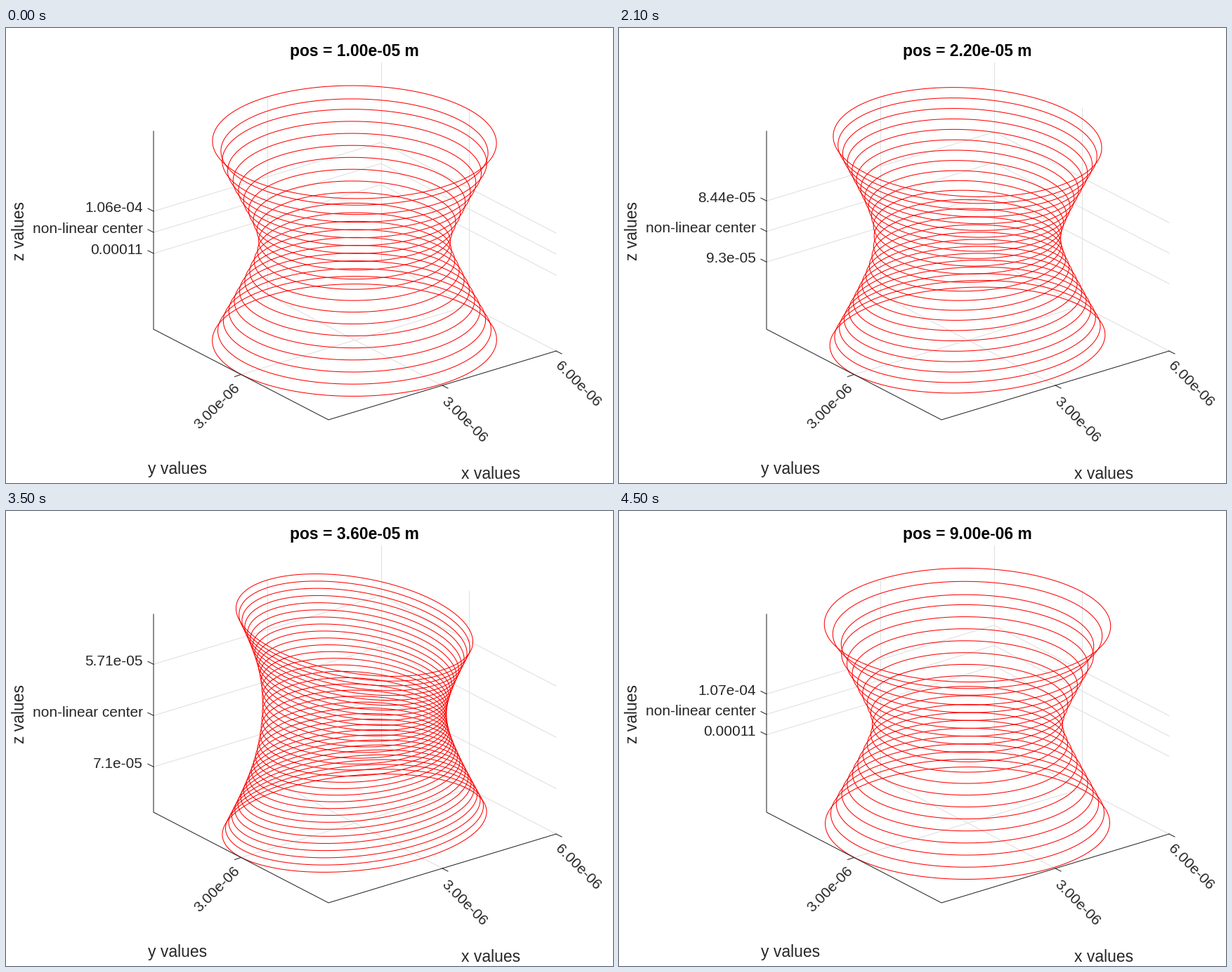
Recreate the animation shown at these times as a matplotlib script. Size 864 px wide and 648 px high, loop 4600 ms.

```python
import numpy as np
import matplotlib.pyplot as plt
from matplotlib.animation import FuncAnimation
from matplotlib.collections import LineCollection

W, H, DPI = 864, 648, 150
plt.rcParams["font.family"] = "Liberation Sans"
INK, GRID = "#262626", "#dfdfdf"

# Oblique box: floor corner nearest the viewer and its edge vectors, in pixels
FRONT = np.array([459, 558])
EX, EY, HEIGHT = np.array([324, -98]), np.array([-249, -129]), 282
LEFT, RIGHT, BACK = FRONT + EY, FRONT + EX, FRONT + EX + EY
CENTER = FRONT + (EX + EY) / 2
MID = CENTER[1] - HEIGHT / 2
UP = np.array([0, -HEIGHT])

# Beam parameters sampled over the position in micrometres
POS = [4, 9, 10, 16, 22, 28, 36, 40]
RINGS = [18, 19.8, 20, 21, 23, 26, 33, 40]
FOCUS_A = [-10, -1.5, -0.5, -8, -18, -34, -56, -68]
FOCUS_B = [-8, 3.5, 5, 12, 19, 27, 42, 48]
TICK_MID = [279, 289.6, 291, 290.7, 289.7, 288.7, 291.3, 288.7]
TICK_GAP = [26, 29, 30, 36, 43.5, 55, 73, 81.5]

RIM = 0.498        # largest radius, in box widths
AIR_STEP = 0.0294  # radius change per ring outside the medium

sequence = [10] * 10 + list(range(11, 41)) + list(range(4, 10))
theta = np.linspace(0, 2 * np.pi, 181)

fig = plt.figure(figsize=(W / DPI, H / DPI), dpi=DPI, facecolor="white")
ax = fig.add_axes([0, 0, 1, 1])
ax.set(xlim=(0, W), ylim=(H, 0))
ax.axis("off")


def line(*pts, color=INK, z=3):
    xs, ys = zip(*pts)
    return ax.plot(xs, ys, color=color, lw=0.5, zorder=z)[0]


def label(x, y, s="", size=10, ha="center", rot=0, **kw):
    kw.setdefault("color", INK)
    return ax.text(x, y, s, fontsize=size, ha=ha, va="baseline", rotation=rot,
                   rotation_mode="anchor", zorder=4, **kw)


def rings(p):
    n = int(round(np.interp(p, POS, RINGS)))
    fa, fb = np.interp(p, POS, FOCUS_A), np.interp(p, POS, FOCUS_B)
    # the waist is rounded off over the non-linear zone
    soft = 0.00122 * np.interp(p, POS, TICK_GAP)
    slope = 0.00138 + 1.6e-6 * p
    if p < 10:
        slope *= n / 20
    half = HEIGHT / 2
    u = np.linspace(-half, half, n + 1)

    def spread(d):
        return np.hypot(slope * d, soft)

    base_a = RIM - spread(half - fa)
    base_b = base_a if p <= 10 else RIM - spread(half + fb)
    a, b = base_a + spread(u - fa), base_b + spread(u - fb)
    if p <= 10:
        # steeper cone in front of the medium's surface
        i = np.arange(n + 1)
        air = RIM - 0.002 + 0.004 * (10 - p) - AIR_STEP * i
        m = 12 - p if p > 7 else int(round(2 + (10 - p) * 0.7))
        out = i < m
        a[out], b[out] = air[out] - 0.004, air[out] + 0.003
    ca, sb = np.outer(a, np.cos(theta)), np.outer(b, np.sin(theta))
    x = CENTER[0] - 0.5 + ca * EX[0] + sb * EY[0]
    y = MID + u[:, None] + ca * EX[1] + sb * EY[1]
    return np.stack([x, y], axis=-1)


# Fixed grid
for start, end in [(FRONT + EX / 2, LEFT + EX / 2), (FRONT + EY / 2, RIGHT + EY / 2),
                   (RIGHT, BACK), (BACK, BACK + UP),
                   (LEFT + EX / 2, LEFT + EX / 2 + UP),
                   (RIGHT + EY / 2, RIGHT + EY / 2 + UP)]:
    line(start, end, color=GRID, z=1)

# Axes with their ticks
line(LEFT + UP, LEFT, FRONT, RIGHT)
for tip in (FRONT + EX / 2, RIGHT):
    line(tip, tip + (8, 4))
line(FRONT + EY / 2, FRONT + EY / 2 + (-9, 3))

label(648.8, 562.2, "3.00e-06", rot=-45)
label(809.8, 511.2, "6.00e-06", rot=-45)
label(304.2, 542.7, "3.00e-06", rot=45)
label(690, 642.5, "x values", 11)
label(244, 635.5, "y values", 11)
label(26.5, 289, "z values", 11, rot=90)
title = label(496, 40, size=11, weight="bold", color="black")

z_grid = [line((0, 0), (1, 1), color=GRID, z=1) for _ in range(3)]
z_tick = [line((0, 0), (1, 1)) for _ in range(3)]
z_text = [label(195, 0, ha="right") for _ in range(3)]
stack = LineCollection([], colors="red", linewidths=0.5, zorder=2)
ax.add_collection(stack)


def update(frame):
    p = sequence[frame]
    mid, gap = np.interp(p, POS, TICK_MID), np.interp(p, POS, TICK_GAP)
    upper = 95.3 - 1.78 * (p - 16) - 0.0064 * (p - 16) ** 2
    lower = upper + 2 * gap * 0.0955
    names = f"{upper * 1e-6:.2e}", "non-linear center", f"{lower * 1e-6:.2g}"
    for k, name in enumerate(names):
        y = mid + (k - 1) * gap
        z_grid[k].set_data([LEFT[0], BACK[0], RIGHT[0]],
                           [y, y + EX[1], y + EX[1] - EY[1]])
        z_tick[k].set_data([LEFT[0] - 8, LEFT[0]], [y - 4, y])
        z_text[k].set_text(name)
        z_text[k].set_y(round(y + 1.3))
    title.set_text(f"pos = {p * 1e-6:.2e} m")
    stack.set_segments(rings(p))
    return [title, stack, *z_grid, *z_tick, *z_text]


anim = FuncAnimation(fig, update, frames=len(sequence), interval=100,
                     repeat=True, repeat_delay=0, blit=False)
plt.show()
```
